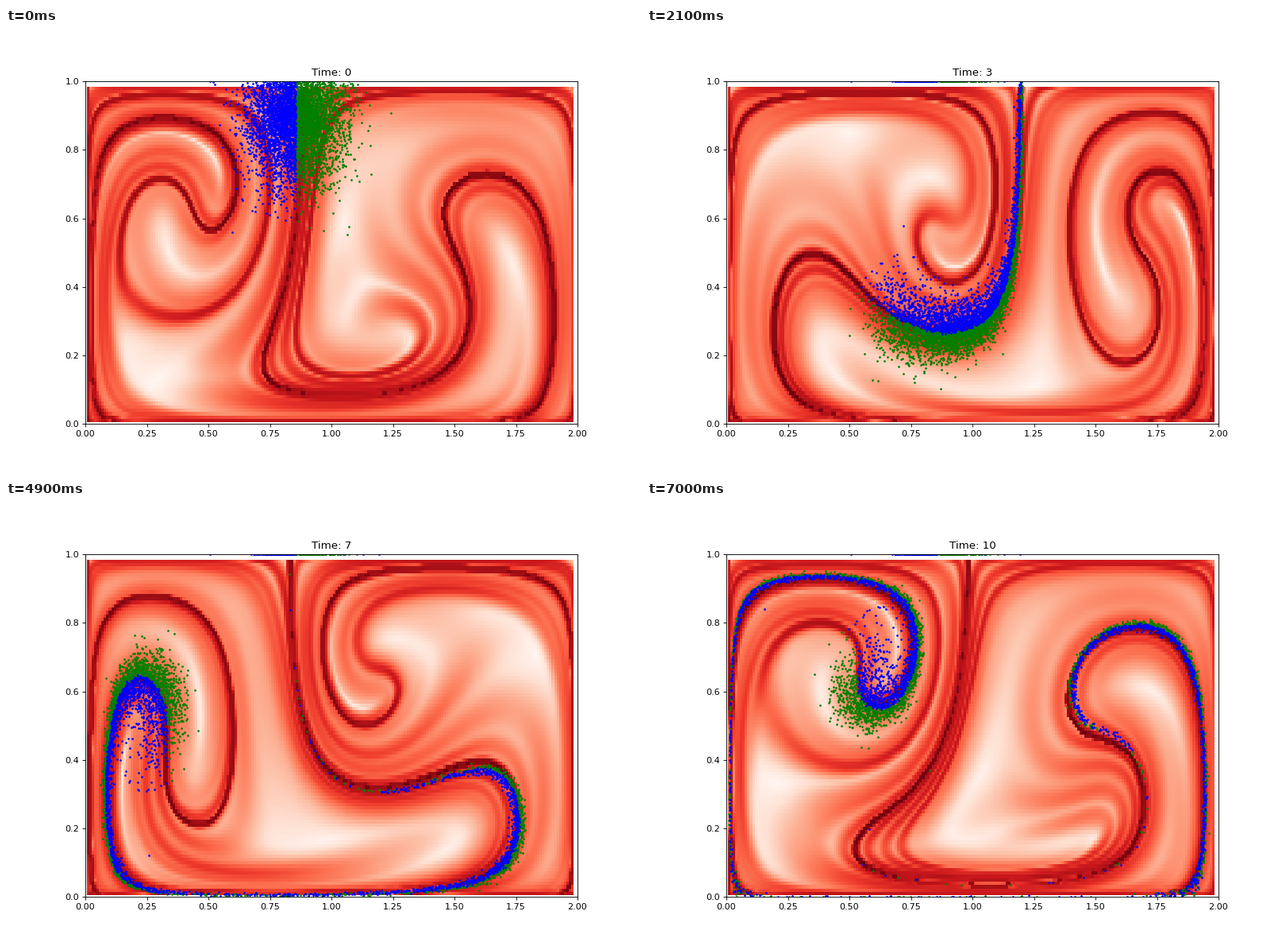
A matplotlib script for the animation above (7700 ms loop, 800 px wide and 560 px high).

```python
import numpy as np
import matplotlib.pyplot as plt
from matplotlib.animation import FuncAnimation

# Double gyre flow
A, EPS, OMEGA = 0.1, 0.25, 0.68
FRAMES, INTERVAL = 11, 700
HORIZON = 15.0
STEP = 0.01


def velocity(x, y, t):
    a = EPS * np.sin(OMEGA * t)
    b = 1 - 2 * a
    f = np.pi * x * (a * x + b)
    slope = 2 * a * x + b
    u = -np.pi * A * np.sin(f) * np.cos(np.pi * y)
    v = np.pi * A * np.cos(f) * np.sin(np.pi * y) * slope
    return u, v


def advect(x, y, t, span, steps):
    """Euler integration; a negative span runs backwards."""
    h = span / steps
    for _ in range(steps):
        u, v = velocity(x, y, t)
        x, y, t = x + h * u, y + h * v, t + h
    return x, y


gx, gy = np.arange(200) * STEP, np.arange(100) * STEP
X, Y = np.meshgrid(gx, gy)


def ftle(t):
    """Backward finite-time Lyapunov exponent on the inner grid points."""
    px, py = advect(X, Y, t, -HORIZON, 300)
    dx_dy, dx_dx = np.gradient(px, STEP)
    dy_dy, dy_dx = np.gradient(py, STEP)
    c11 = dx_dx**2 + dy_dx**2
    c12 = dx_dx * dx_dy + dy_dx * dy_dy
    c22 = dx_dy**2 + dy_dy**2
    top = (c11 + c22) / 2 + np.hypot((c11 - c22) / 2, c12)
    return (np.log(top) / (2 * HORIZON))[1:-1, 1:-1]


def tracer_paths():
    """Positions per frame; tracers that reach a wall stick to it."""
    rng = np.random.default_rng(7)
    x = rng.normal(0.855, 0.095, 5600)
    y = rng.normal(0.9, 0.1, 5600)
    keep = y < 1.015
    x, y = x[keep], y[keep]
    left = x < 0.855
    paths = [np.column_stack([x, y])]
    for n in range(FRAMES - 1):
        free = (y > 0) & (y < 1)
        nx, ny = advect(x, y, n, 1.0, 50)
        ny = ny + rng.normal(0, 0.002, len(y))
        x = np.where(free, nx, x)
        y = np.clip(np.where(free, ny, y), 0, 1)
        paths.append(np.column_stack([x, y]))
    return paths, left


fields = [ftle(n) for n in range(FRAMES)]
paths, left = tracer_paths()

fig, ax = plt.subplots(figsize=(10, 7), dpi=80)
mesh = ax.pcolormesh(gx[1:-1], gy[1:-1], fields[0], cmap="Reds", shading="nearest")
green = ax.scatter(*paths[0][~left].T, s=2, color="green")
blue = ax.scatter(*paths[0][left].T, s=2, color="blue")
ax.set_xlim(0, 2)
ax.set_ylim(0, 1)
title = ax.set_title("Time: 0", pad=6.6)


def update(n):
    mesh.set_array(fields[n])
    mesh.set_clim(fields[n].min(), fields[n].max())
    green.set_offsets(paths[n][~left])
    blue.set_offsets(paths[n][left])
    title.set_text(f"Time: {n}")
    return mesh, green, blue, title


anim = FuncAnimation(fig, update, frames=FRAMES, interval=INTERVAL,
                     repeat=True, repeat_delay=0)
plt.show()
```
